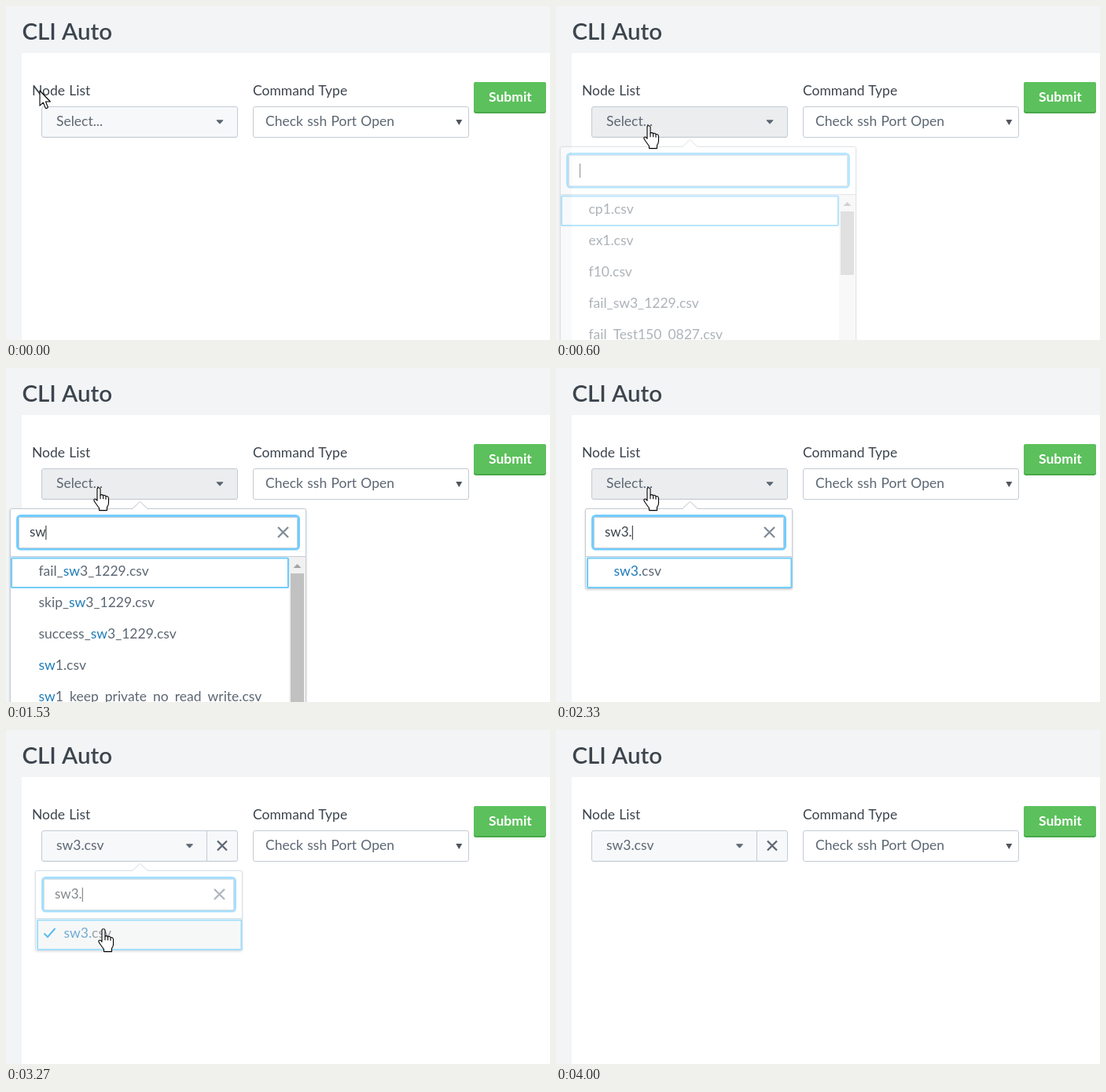
Animation, 692 px wide and 426 px high, one loop 4.39 s. Source, as an HTML page:

```html
<!DOCTYPE html>
<html lang="en">
<head>
<meta charset="utf-8">
<title>CLI Auto</title>
<style>
  html, body { margin: 0; width: 100%; height: 100%; overflow: hidden; background: #f2f4f5; }
  svg { display: block; width: 692px; height: 426px; }
  text { font: 17.5px Lato, "Open Sans", sans-serif; word-spacing: .8px; fill: #5c6773; }
  .label { fill: #3c444d; }
  .title { font-size: 29.5px; font-weight: 600; fill: #3c444d; }
  .submit { font-weight: 700; fill: #fff; }
  .query { font-size: 17px; fill: #3c444d; }
  .hit { fill: #1e7dba; }
  .box { fill: #fff; stroke: #c3cbd4; }
  .line { fill: none; stroke: #c3cbd4; }
  .glow { fill: none; stroke: #00a4fd; stroke-opacity: .55; stroke-width: 3; filter: blur(.4px); }
  .focus { fill: none; stroke: #73cdfa; stroke-width: 2.2; }
  .cross { fill: none; stroke: #818d99; stroke-width: 2.3; }
  .dark { stroke: #5c6773; }
  .caret { fill: none; stroke: #222; }
  .check { fill: none; stroke: #0094e0; stroke-width: 2; }
  .panel { filter: drop-shadow(0 1px 1.5px rgba(0, 0, 0, .16)); }
  .tip { fill: #5c6773; stroke: #5c6773; stroke-linejoin: round; }
  .small { fill: #50565e; }
  .scroll { fill: #a3a3a3; }
  .pointer path { fill: #fff; stroke: #000; stroke-width: 1.1; stroke-linejoin: round; }
  .k { animation: 4390ms step-end infinite; }
</style>
</head>
<body>
<svg id="stage" viewBox="0 0 692 426"></svg>
<script>
const LOOP = 4390, TICK = 1000 / 15;
let css = '', count = 0;

// Keyframes from [ms, declaration, steps]; without steps the value holds
function keys(list) {
  const name = 'k' + count++;
  const rows = list.map(([ms, rule, n]) => {
    const pace = n ? `;animation-timing-function:steps(${n},start)` : '';
    return `${(Math.max(0, ms - 1) / LOOP * 100).toFixed(3)}%{${rule}${pace}}`;
  });
  css += `@keyframes ${name}{${rows.join('')}}`;
  return `class="k" style="animation-name:${name}"`;
}
const during = (on, off = LOOP) => keys([
  [0, `opacity:${on ? 0 : 1}`],
  ...(on ? [[on, 'opacity:1']] : []),
  ...(off < LOOP ? [[off, 'opacity:0']] : [])
]);
const fade = (ms, n, from, to) => keys([
  [0, 'opacity:0'], [ms, `opacity:${from}`, n], [ms + n * TICK, `opacity:${to}`], [ms + (n + .1) * TICK, 'opacity:0']
]);

// Each leg moves the pointer to x, y in n equal ticks
function travel(x, y, legs) {
  const at = () => `transform:translate(${x}px,${y}px)`;
  const list = [[0, at()]];
  for (const leg of legs) {
    list.push([leg.start, at(), leg.n]);
    ({ x, y } = leg);
    list.push([leg.start + leg.n * TICK - 2, at()]);
  }
  return keys(list);
}

const group = (attrs, body) => `<g ${attrs}>${body}</g>`;
const text = (x, y, body, cls = '') => `<text x="${x}" y="${y}" class="${cls}">${body}</text>`;
const rect = (x, y, w, h, attrs) => `<rect x="${x}" y="${y}" width="${w}" height="${h}" ${attrs}/>`;
const path = (d, cls = '') => `<path d="${d}" class="${cls}"/>`;
const cross = (x, y, r, cls = '') =>
  path(`M${x - r} ${y - r}l${2 * r} ${2 * r}m0 ${-2 * r}l${-2 * r} ${2 * r}`, 'cross ' + cls);
const glow = (x, y, w, h) => rect(x - 1.5, y - 1.5, w + 3, h + 3, 'rx="4" class="glow"');
const tip = x => path(`M${x - 4} 145.8h8l-4 4.4z`, 'tip');

// Highlight the first match
const mark = (name, query) => query ? name.replace(query, '<tspan class="hit">$&</tspan>') : name;

const scrollbar = thumb =>
  rect(360, 241, 21, 185, 'fill="#f1f1f1"') +
  rect(362, 262, 17, thumb, 'fill="#c1c1c1"') +
  path('M365.5 255h10l-5 -5z', 'scroll');

function popup({ query, names, thumb, caretX, caret = '', ring = '', picked }) {
  const [x, w] = thumb ? [5, 377] : [37, 264];
  const right = x + w, bottom = 241.5 + names.length * 40;
  const from = x + (thumb ? 2 : 3), to = thumb ? 359 : right - 1.5;
  return path(`M${x + 2.5} 179.5H161L170.5 170.5 180 179.5H${right - 2.5}q2 0 2 2` +
      `V${bottom - 2}q0 2-2 2H${x + 2.5}q-2 0-2-2V181.5q0-2 2-2z`, 'box panel') +
    group(ring, glow(x + 11, 190, w - 22, 39.5)) +
    rect(x + 11.5, 190.5, w - 23, 39, 'rx="2" class="box"') +
    text(x + 25, 215, query, 'query') +
    group(caret, path(`M${caretX} 201v18`, 'caret')) +
    (query ? cross(right - 29.5, 209.5, 6.5) : '') +
    path(`M${x + 1} 240.5H${right - 1}`, 'line') +
    (thumb ? scrollbar(thumb) : '') +
    (picked ? rect(from, 242, to - from, 38, 'fill="#f2f4f5"') + path('M48.5 259.5l4.5 4.5 9.5-11', 'check') : '') +
    rect(from, 242.5, to - from, 37.5, 'rx="1" class="focus"') +
    names.map((name, i) => text(x + 36.5, 265 + i * 40, mark(name, query))).join('');
}

const all = ['cp1.csv', 'ex1.csv', 'f10.csv', 'fail_sw3_1229.csv', 'fail_Test150_0827.csv'];
const dated = ['fail', 'skip', 'success'].map(s => s + '_sw3_1229.csv');
const single = ['sw3.csv'];

const page =
  rect(0, 0, 692, 426, 'fill="#f2f4f5"') +
  rect(20, 60, 672, 366, 'fill="#fff"') +
  text(20.5, 43, 'CLI Auto', 'title') +
  text(33, 114, 'Node List', 'label') +
  text(314, 114, 'Command Type', 'label') +
  rect(314.5, 128.5, 274, 39, 'rx="2.5" class="box"') +
  text(330, 153, 'Check ssh Port Open') +
  path('M572.3 145h8l-4 7z', 'small') +
  rect(595, 97, 92, 40, 'rx="3" fill="#49a849"') +
  rect(595, 97, 92, 38, 'rx="3" fill="#5cc05c"') +
  text(614, 122, 'Submit', 'submit');

const button =
  group(during(330, 530), glow(45, 128, 250, 40)) +
  group(keys([[0, 'fill:#f7f8fa'], [200, 'fill:#e1e6eb'], [530, 'fill:#ebedef'], [3270, 'fill:#f7f8fa']]),
    rect(45.5, 128.5, 249, 39, 'rx="2.5" stroke="#c3cbd4"')) +
  path('M47 167.3H293', 'line') +
  group(during(0, 3270), text(64, 153, 'Select...') + tip(272)) +
  group(during(3270),
    text(64, 153, 'sw3.csv') + tip(233.5) + path('M255.5 129v38', 'line') + cross(275, 147.5, 6, 'dark'));

const menus =
  group(fade(530, 4, 0, 1), popup({ query: '', names: all, thumb: 81, caretX: 30.5 })) +
  group(during(800, 1530),
    popup({ query: 's', names: all, thumb: 81, caretX: 37.5, caret: during(0, 1330) })) +
  group(during(1530, 1870),
    popup({ query: 'sw', names: [...dated, 'sw1.csv', 'sw1_keep_private_no_read_write.csv'],
      thumb: 164, caretX: 50.9 })) +
  group(during(1870, 2330),
    popup({ query: 'sw3', names: [...dated, 'sw3.csv', 'sw3_1229.csv'], caretX: 93.5 })) +
  group(during(2330, 3270),
    popup({ query: 'sw3.', names: single, caretX: 97.3, caret: during(0, 2870), ring: during(0, 3130) })) +
  group(fade(3270, 3, .95, 0), popup({ query: 'sw3.', names: single, caretX: 97.3, picked: true }));

const arrow = path('M0 0V19.2L4.3 15.1 7.3 22.2Q8.9 23.2 10.4 21.2L7.5 14H13.4Z');
const hand = group('transform="translate(-7 -.8)"',
  path('M5 2.4Q5 .6 7 .6T9 2.4V9.8Q11.2 8.8 12.6 10.3 14.8 9.6 16 11.3 19.5 11 19.5 14.5V20' +
    'Q19.5 23 17.5 25.5V29.4H7.5V26.5Q5 23 2.5 19.5 .3 16.4 1 15.4 3 13.8 5 17Z') +
  path('M9 9.8V15M12.6 10.3V15M16 11.3V15.5'));
const beam = path('M-3.5 -9h7M0 -9v18M-3.5 9h7');

const moves = travel(43, 108, [
  { start: 70, n: 5, x: 118, y: 153 },
  { start: 2400, n: 2, x: 113, y: 142 },
  { start: 2535, n: 5, x: 67, y: 211 },
  { start: 2870, n: 2, x: 124, y: 254 },
  { start: 3335, n: 7, x: 139, y: 328 },
  { start: 3802, n: 4, x: 20, y: 450 }
]);
const pointer = group('class="pointer"', group(moves,
  group(during(0, 200), arrow) +
  group(during(200, 2600), hand) +
  group(during(2600, 2667), arrow) +
  group(during(2667, 2870), beam) +
  group(during(2870, 3465), hand) +
  group(during(3465), arrow)));

const sheet = document.createElement('style');
sheet.textContent = css;
document.head.append(sheet);
document.getElementById('stage').innerHTML = page + button + menus + pointer;
</script>
</body>
</html>
```
